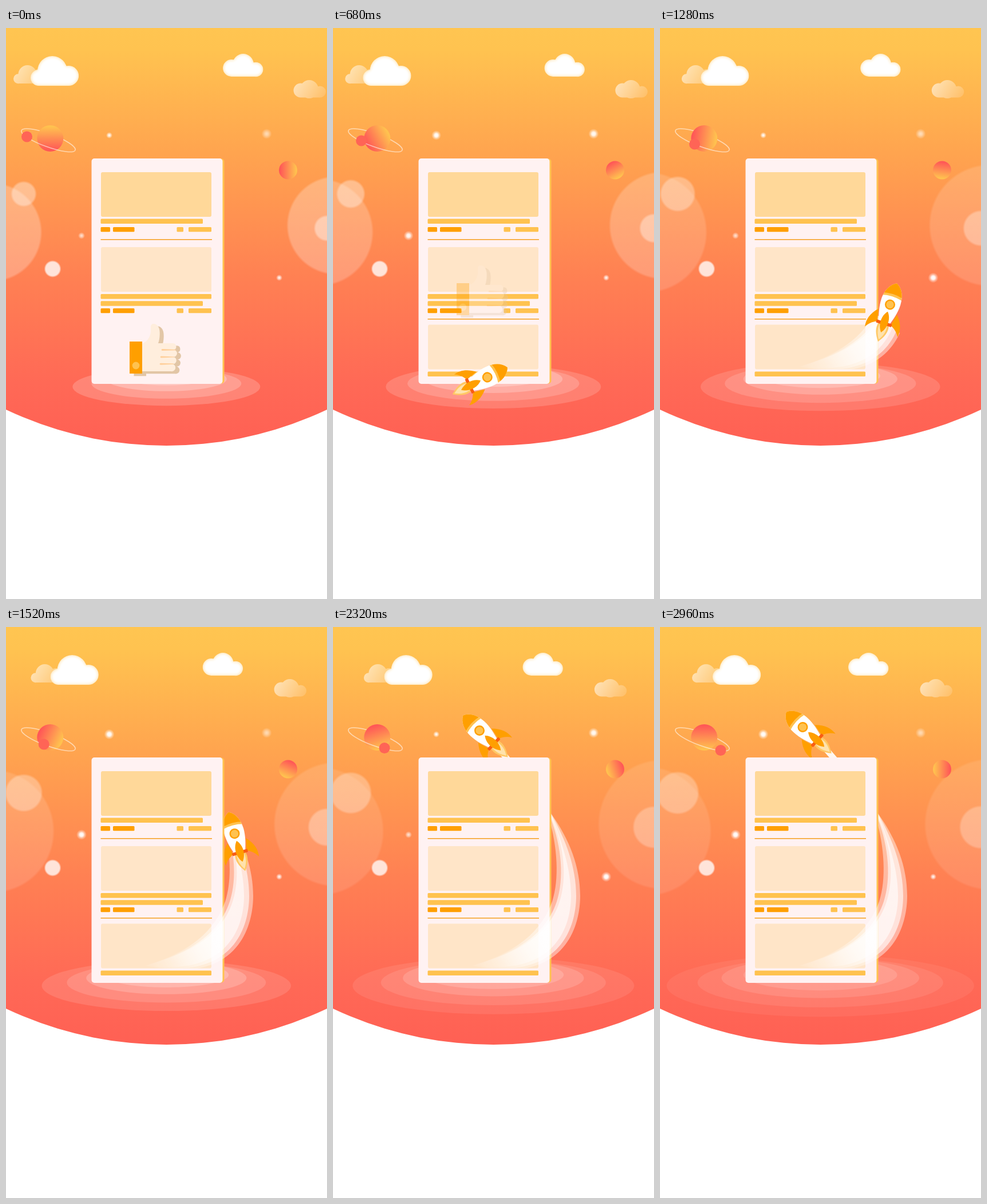
An HTML page with a canvas that plays this animation: 561x998 px, repeating every 3 s.

```html
<!DOCTYPE html>
<html>
<head>
<meta charset="utf-8">
<style>
  html, body { margin: 0; width: 100%; height: 100%; overflow: hidden; background: #fff; }
  canvas { display: block; }
</style>
</head>
<body>
<canvas id="stage" width="561" height="998"></canvas>
<script>
const W = 561, H = 998, LOOP = 3000, STEP = 40, TAU = Math.PI * 2;
const main = document.getElementById('stage').getContext('2d');
const layer = document.createElement('canvas');
layer.width = W;
layer.height = H;
const layerCtx = layer.getContext('2d');
let c = main;

const ORANGE = '#ff9f00', YELLOW = '#ffc24f', RED = '#ff5757', PAPER = '#fff2f2';
const white = a => `rgba(255,255,255,${a})`;
const clamp = v => Math.max(0, Math.min(1, v));
const mix = (a, b, p) => a + (b - a) * p;

// cubic-bezier(x1, 0, x2, 1)
function ease(x, x1 = .33, x2 = .364) {
  let lo = 0, hi = 1, s = .5;
  for (let i = 0; i < 24; i++) {
    s = (lo + hi) / 2;
    const v = 3 * (1 - s) ** 2 * s * x1 + 3 * (1 - s) * s * s * x2 + s ** 3;
    if (v < x) lo = s; else hi = s;
  }
  return s * s * (3 - 2 * s);
}

// monotone cubic interpolation through key values
function track(keys, vals) {
  const n = keys.length;
  const slope = i => (vals[i + 1] - vals[i]) / (keys[i + 1] - keys[i]);
  const tan = vals.map((_, i) => {
    if (i === 0) return slope(0);
    if (i === n - 1) return slope(n - 2);
    const a = slope(i - 1), b = slope(i);
    return a * b <= 0 ? 0 : 2 * a * b / (a + b);
  });
  return t => {
    if (t >= keys[n - 1]) return vals[n - 1];
    let i = 0;
    while (t > keys[i + 1]) i++;
    const h = keys[i + 1] - keys[i], u = (t - keys[i]) / h, u2 = u * u, u3 = u2 * u;
    return (2 * u3 - 3 * u2 + 1) * vals[i] + (u3 - 2 * u2 + u) * h * tan[i]
      + (3 * u2 - 2 * u3) * vals[i + 1] + (u3 - u2) * h * tan[i + 1];
  };
}

const KEYS = [0, 400, 960, 1280, 1880, 2320, 2960];
const spin = track(KEYS, [0, 40, 80, 97, 140, 162, 180]);
const grow = track(KEYS, [0, .07, .55, .72, .89, .965, 1]);
const moonX = track(KEYS, [36.5, 44.5, 54.5, 60.5, 76, 90, 106]);
const moonY = track(KEYS, [190, 194, 200, 203, 208, 211.5, 215.5]);
const FLIGHT = [0, 400, 960, 1280, 1460, 1660, 1880, 2320, 2960];
const rocketX = track(FLIGHT, [205, 239, 311, 402, 405, 366, 303, 256, 249.5]);
const rocketY = track(FLIGHT, [632, 622, 590, 483.5, 389, 303, 232, 181, 175]);
const rocketA = track(FLIGHT, [-17, -21, -35, -72, -98, -121, -131, -137, -137.6]);

function disc(x, y, r, fill) {
  c.fillStyle = fill;
  c.beginPath();
  c.arc(x, y, r, 0, TAU);
  c.fill();
}

function box(x1, y1, x2, y2, fill, r = 1.5) {
  c.fillStyle = fill;
  c.beginPath();
  c.roundRect(x1, y1, x2 - x1, y2 - y1, r);
  c.fill();
}

function shape(d, fill) {
  c.fillStyle = fill;
  c.fill(new Path2D(d));
}

function group(alpha, draw) {
  if (alpha <= 0) return;
  c = layerCtx;
  c.clearRect(0, 0, W, H);
  draw();
  c = main;
  c.globalAlpha = alpha;
  c.drawImage(layer, 0, 0);
  c.globalAlpha = 1;
}

function linear(x1, y1, x2, y2, ...stops) {
  const g = c.createLinearGradient(x1, y1, x2, y2);
  stops.forEach(([p, col]) => g.addColorStop(p, col));
  return g;
}

function sky() {
  c.fillStyle = '#fff';
  c.fillRect(0, 0, W, H);
  c.fillStyle = linear(0, 0, 0, 730, [0, '#ffc551'], [.05, '#ffc350'],
    [.3, '#ffa44f'], [.6, '#ff8053'], [.85, '#ff6956'], [1, '#ff6054']);
  c.beginPath();
  c.rect(0, 0, W, 667);
  c.fill();
  c.beginPath();
  c.arc(280.5, 74, 656, 0, Math.PI);
  c.fill();
}

function softDisc(x, y, r, alpha, soft) {
  const g = c.createRadialGradient(x, y, 0, x, y, r + soft);
  g.addColorStop(0, white(alpha));
  g.addColorStop((r - soft) / (r + soft), white(alpha));
  g.addColorStop(1, white(0));
  disc(x, y, r + soft, g);
}

function bubbles(t, p) {
  const g = grow(t), fade = mix(.25, .1, g);
  softDisc(-23.5, 357, mix(85, 112, g), fade, 2);
  softDisc(577, 345, mix(85, 113.5, g), fade, 2);
  softDisc(31, 290, mix(21, 36, p), mix(.37, .28, p), 2);
  softDisc(561, 350, mix(21.5, 36.5, p), mix(.4, .26, p), 2);
  softDisc(81.5, 421, 13.5, .78, 1.5);
}

function star(t, x, y, peaks, r, dim) {
  const d = Math.min(...peaks.map(k => Math.abs(t - k)));
  const k = clamp((400 - d) / 200), size = mix(r, 9, k), a = mix(dim, 1, k);
  const g = c.createRadialGradient(x, y, 0, x, y, size);
  g.addColorStop(0, white(a));
  g.addColorStop(.35, white(a * mix(.75, .9, k)));
  g.addColorStop(.65, white(a * .4));
  g.addColorStop(1, white(0));
  disc(x, y, size, g);
}

function stars(t) {
  const even = [450, 1700, 2950];
  star(t, 180.5, 187.5, even, 5.5, 1);
  star(t, 132, 363, even, 6, .75);
  star(t, 455.5, 185, [900, 2100], 9, .6);
  star(t, 477.5, 436.5, [1110, 2360], 5.5, .95);
}

// puffs: [x, y, radius]; the base joins the outer two
function cloudPath(puffs, bottom, inset) {
  const [l, m, r] = puffs;
  c.beginPath();
  for (const [x, y, rad] of puffs) {
    c.moveTo(x + rad - inset, y);
    c.arc(x, y, rad - inset, 0, TAU);
  }
  c.rect(l[0], m[1], r[0] - l[0], bottom - inset - m[1]);
}

function whiteCloud(dx, puffs, bottom) {
  c.save();
  c.translate(dx, 0);
  cloudPath(puffs, bottom, 0);
  c.clip();
  c.fillStyle = '#ffe2a8';
  c.fill();
  c.filter = 'blur(3px)';
  cloudPath(puffs, bottom, 2.5);
  c.fillStyle = '#fff';
  c.fill();
  c.fill();
  c.restore();
}

function paleCloud(dx, puffs, bottom, x1, x2) {
  c.save();
  c.translate(dx, 0);
  cloudPath(puffs, bottom, 0);
  c.fillStyle = linear(x1, bottom - 30, x2, bottom, [0, white(.62)], [1, white(.12)]);
  c.fill();
  c.restore();
}

function clouds(p) {
  paleCloud(43 * p, [[21.5, 88.7, 8.5], [37.5, 81, 16], [57, 84.5, 12.5]], 97, 13, 72);
  whiteCloud(49 * p, [[57, 87, 14], [81, 75, 26], [109.7, 83.5, 17.5]], 101);
  whiteCloud(-50 * p, [[394, 70, 15], [414.5, 63.5, 18.5], [436.7, 72.5, 12.7]], 85);
  paleCloud(-48 * p, [[515, 109, 12.5], [530, 107, 16], [549, 111.5, 10]], 121.5, 502, 560);
}

function globe(x, y, r, deg) {
  const a = deg * Math.PI / 180, dx = Math.cos(a) * r, dy = Math.sin(a) * r;
  disc(x, y, r, linear(x + dx, y + dy, x - dx, y - dy, [0.05, RED], [.95, YELLOW]));
}

function orbit(from, to) {
  c.strokeStyle = white(.55);
  c.lineWidth = 1.6;
  c.beginPath();
  c.ellipse(74, 196.3, 50, 11.5, 20 * Math.PI / 180, from, to);
  c.stroke();
}

function planets(t) {
  const turn = spin(t);
  orbit(Math.PI, TAU);
  globe(77.3, 193, 23, 90 + turn);
  orbit(0, Math.PI);
  disc(moonX(t), moonY(t), 9.5, '#ff6456');
  globe(493, 248.5, 16, 180 + turn);
}

function ripples(q) {
  const s = 1 + .647 * q;
  const rings = [[164, 627, .19, .7], [131, 621.4, .2, .6], [105.5, 613.5, .26, .55], [82, 608, .28, .55]];
  for (const [rx, y, a, loss] of rings) {
    c.fillStyle = white(a * (1 - loss * q));
    c.beginPath();
    c.ellipse(280.3, y, rx * s, rx * s * .202, 0, 0, TAU);
    c.fill();
  }
}

function tags(y) {
  box(165.5, y, 182, y + 8.3, ORANGE);
  box(187, y, 224.5, y + 8.3, ORANGE);
  box(298.5, y, 310, y + 8.3, YELLOW);
  box(319, y, 359, y + 8.3, YELLOW);
}

const bar = (y, x2) => box(165.5, y, x2, y + 8.5, YELLOW);
const rule = y => box(165.5, y, 360, y + 1.5, '#f5a01f', 0);

function card(t) {
  box(155, 228.5, 381.5, 621.5, YELLOW, 5);
  box(149.5, 228, 378.5, 622, PAPER, 5);
  box(166, 252, 359, 330, '#ffd899', 3);
  bar(333.5, 344);
  tags(348);
  rule(369);
  box(166, 383, 359, 461, '#ffe5c8', 3);
  bar(465, 359);
  bar(477.3, 344);
  tags(490);
  group(clamp(t / 600), () => {
    rule(508);
    box(166, 518.5, 359, 596.5, '#ffe5c8', 3);
    bar(600.5, 359);
  });
}

const HAND = 'M237 552C246 549 252 541 253 531L253 523C253 517 257 516 261 517.5C267 520 269 527 268.7 535' +
  'C268.5 542 267.5 547 266 551L292 551A5.9 5.9 0 0 1 293 562.6A6.2 6.2 0 0 1 292.5 575' +
  'A6 6 0 0 1 291 587.2A6.3 6.3 0 0 1 288.5 600L237 600Z';

function thumb(t) {
  group(clamp(1 - t / 1000), () => {
    c.save();
    c.translate(0, -.15 * t);
    c.save();
    c.translate(7, 4.3);
    shape(HAND, '#e2c6a6');
    box(216.5, 590, 238, 604, '#e2c6a6', 0);
    c.restore();
    shape(HAND, '#ffeedd');
    for (const [x1, x2, y] of [[273, 297, 562.6], [271, 294, 575], [270, 293, 587.2]])
      shape(`M${x1} ${y - 1.5}L${x2} ${y - .6}L${x2} ${y + .6}L${x1} ${y + 1.5}Q${x1 - 3} ${y} ${x1} ${y - 1.5}Z`, '#ffcf9a');
    box(216, 548, 238, 604, ORANGE, 0);
    disc(227, 590, 6.4, YELLOW);
    c.restore();
  });
}

const BODY = 'M39 0C34 -11 20 -17.5 5 -17.5C-10 -17.5 -22 -13.5 -33 -10L-33 10C-22 13.5 -10 17.5 5 17.5C20 17.5 34 11 39 0Z';

function rocket(t) {
  group(clamp((t - 150) / 400), () => {
    c.save();
    c.translate(rocketX(t), rocketY(t));
    c.rotate(rocketA(t) * Math.PI / 180);
    shape('M-35 -9C-46 -13 -57 -8 -68 0C-57 8 -46 13 -35 9Z', '#ffc864');
    shape('M-35 -6C-45 -9 -55 -6 -64 0C-55 6 -45 9 -35 6Z', '#ffe2ac');
    for (const s of [-1, 1])
      shape(`M-13 ${s * 17}C-26 ${s * 29} -38 ${s * 32} -50 ${s * 30}C-43 ${s * 26} -38 ${s * 21} -34 ${s * 12}Z`, ORANGE);
    shape(BODY, '#fff');
    c.save();
    c.clip(new Path2D(BODY));
    shape('M12 -20Q18 0 12 20L45 20L45 -20Z', YELLOW);
    shape('M16 -20Q22 0 16 20L45 20L45 -20Z', ORANGE);
    c.restore();
    box(-37, -14, -31.5, 14, '#f95d13', 1);
    shape('M-13 0C-23 -9 -40 -9 -51 0C-40 9 -23 9 -13 0Z', ORANGE);
    disc(0, 0, 9, ORANGE);
    disc(0, 0, 6.6, YELLOW);
    c.restore();
  });
}

function trail(t) {
  if (t < 900) return;
  const a = rocketA(t) * Math.PI / 180, cx = 290, cy = 430;
  const bx = rocketX(t) - 30 * Math.cos(a), by = rocketY(t) - 30 * Math.sin(a);
  c.save();
  c.beginPath();
  c.moveTo(cx, cy);
  c.arc(cx, cy, 420, Math.atan2(by - cy, bx - cx), 2.4);
  c.clip();
  const fill = k => linear(245, 605, 375, 530, [0, white(0)], [.3, white(k * .25)], [.75, white(k * .85)], [1, white(k)]);
  for (const [i, o, k] of [[0, 0, .45], [8, 7, .62], [13, 16, .6]])
    shape(`M243 592C300 575 ${360 + i} ${545 + i / 2} ${383 + i} 480C${396 + i} 440 ${392 + i} 385 ${378 + i / 3} 335` +
      `C345 280 315 250 282 212L290 206C325 245 360 290 381 326C${414 - o} 372 ${432 - o} 420 ${432 - o} 470` +
      `C${432 - o} 520 ${408 - o} ${628 - o} 243 592Z`, fill(k));
  c.restore();
}

function draw(t) {
  const q = t / LOOP, p = ease(q), behind = t > 1400;
  sky();
  bubbles(t, p);
  clouds(p);
  stars(t);
  planets(t);
  ripples(q);
  trail(t);
  if (behind) rocket(t);
  card(t);
  thumb(t);
  c.save();
  c.beginPath();
  c.rect(149.5, 440, 232, 182);
  c.clip();
  trail(t);
  c.restore();
  if (!behind) rocket(t);
}

let start = null;
function tick(now) {
  if (start === null) start = now;
  const t = Math.max(0, now - start) % LOOP;
  draw(Math.floor(t / STEP) * STEP);
  requestAnimationFrame(tick);
}
draw(0);
requestAnimationFrame(tick);
</script>
</body>
</html>
```
